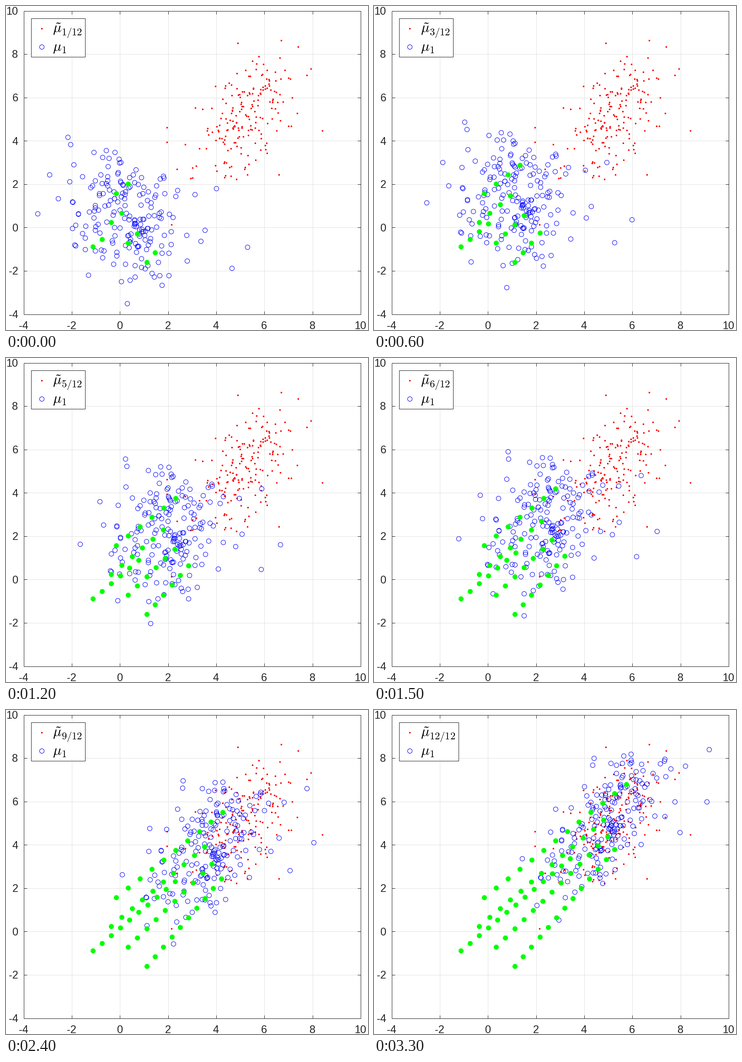
A matplotlib script that plays this animation: 792 px wide and 707 px high, repeating every 3.6 s.

```python
import numpy as np
import matplotlib.pyplot as plt
from matplotlib.animation import FuncAnimation
from matplotlib.patches import Rectangle

W, H, DPI = 792, 707, 64
PX = 72 / DPI                      # points per pixel
STEPS = 12
LEFT, RIGHT, TOP, BOTTOM = 38.5, 776, 10.5, 672.5
SCALE = np.array([(RIGHT - LEFT) / 14, (TOP - BOTTOM) / 14])
ORIGIN = np.array([LEFT, BOTTOM]) + 4 * SCALE
INK, GRID = "#262626", "#e2e2e2"

plt.rcParams["font.family"] = "Liberation Sans"
plt.rcParams["mathtext.fontset"] = "cm"
plt.rcParams["axes.unicode_minus"] = False

# Affine displacement field: shift + GAIN @ point
SHIFT = np.array([5.026, 5.043])
GAIN = np.array([[-0.008, 0.554], [0.554, 0.175]])

TRACKED = np.array([(-0.15, 1.57), (-0.36, 0.25), (-1.12, -0.89),
                    (0.34, -0.72), (1.12, -1.60)])
BLUE_RIM = [(-3.86, 0.40), (-2.76, 3.82), (-2.63, 3.48), (-1.14, 3.15),
            (0.06, -3.86), (3.52, 1.20), (4.34, -2.45), (4.94, -1.52),
            (-3.44, 2.14), (-1.62, -2.50)]
RED_RIM = [(4.90, 8.51), (6.70, 8.64), (7.39, 8.35), (7.93, 7.33),
           (8.40, 4.48), (1.95, 4.62), (1.95, 3.95), (2.14, 0.14),
           (6.60, 2.43), (2.93, 2.26)]


def to_px(p):
    return ORIGIN + np.asarray(p) * SCALE


def moved(start, step):
    return start + (SHIFT + start @ GAIN) * step / STEPS


def cloud(rng, n, mean, spread, rho, rim):
    """Correlated normal sample without far tails, plus a few rim points."""
    z = rng.standard_normal((n * 2, 2))
    z = z[np.hypot(*z.T) < 2.3][:n]
    z[:, 1] = rho * z[:, 0] + np.sqrt(1 - rho**2) * z[:, 1]
    return np.vstack([mean + z * spread, rim])


rng = np.random.default_rng(12)
red = cloud(rng, 188, (5.1, 5.0), (1.25, 1.4), 0.5, RED_RIM)
blue = cloud(rng, 186, (0.0, -0.05), (1.5, 1.4), -0.35, BLUE_RIM)

fig = plt.figure(figsize=(W / DPI, H / DPI), dpi=DPI, facecolor="white")
ax = fig.add_axes([0, 0, 1, 1])
ax.set_xlim(0, W)
ax.set_ylim(H, 0)
ax.axis("off")


def line(xs, ys, color, z):
    ax.plot(xs, ys, color=color, lw=PX, zorder=z, solid_capstyle="butt")


def box(x, y, w, h, z, face="none"):
    return ax.add_patch(Rectangle((x, y), w, h, fc=face, ec=INK, lw=PX, zorder=z))


def dots(points, size, z, **style):
    art, = ax.plot(*np.transpose(points), ls="none", marker="o",
                   ms=size * PX, zorder=z, **style)
    art.set_snap(False)
    return art


def text(x, y, s, size, color="black", ha="left"):
    return ax.text(x, y, s, fontsize=size * PX, color=color, ha=ha,
                   va="baseline", zorder=8)


for v in range(-4, 11, 2):
    x, y = to_px((v, v))
    if -4 < v < 10:
        line([x, x], [TOP, BOTTOM], GRID, 1)
        line([LEFT, RIGHT], [y, y], GRID, 1)
        for edge, inward in ((TOP, 7), (BOTTOM, -7)):
            line([x, x], [edge, edge + inward], INK, 2)
        for edge, inward in ((LEFT, 7), (RIGHT, -7)):
            line([edge, edge + inward], [y, y], INK, 2)
    text(x - 0.5, 705, str(v), 23.5, INK, "center")
    text(26.5, y + 8.3, str(v), 23.5, INK, "right")
box(LEFT, TOP, RIGHT - LEFT, BOTTOM - TOP, 2)

RED = dict(color="red", mew=0)
BLUE = dict(mfc="none", mec="blue", mew=PX)
dots(to_px(red), 3.6, 3, **RED)
rings = dots(to_px(blue), 10, 4, **BLUE)
trail = dots(to_px(TRACKED), 10, 5, color="lime", mew=PX)

frame = box(54.5, 26.5, 118, 84, 7, "white")
dots([(77.5, 48.5)], 3.6, 8, **RED)
dots([(77.5, 88.5)], 10, 8, **BLUE)
text(102, 58.5, r"$\tilde{\mu}$", 31)
text(102, 98.5, r"$\mu$", 31)
text(121, 103, "$1$", 22.5)
label = text(121, 63.5, "", 22.5)


def update(i):
    step = i + 1
    rings.set_data(*to_px(moved(blue, step)).T)
    path = np.vstack([moved(TRACKED, k) for k in range(step + 1)])
    trail.set_data(*to_px(path).T)
    label.set_text(f"${step}/{STEPS}$")
    frame.set_width(118 if step < 10 else 130)
    return rings, trail, label, frame


anim = FuncAnimation(fig, update, frames=STEPS, interval=300,
                     init_func=lambda: update(0), repeat=True, repeat_delay=0)
plt.show()
```
